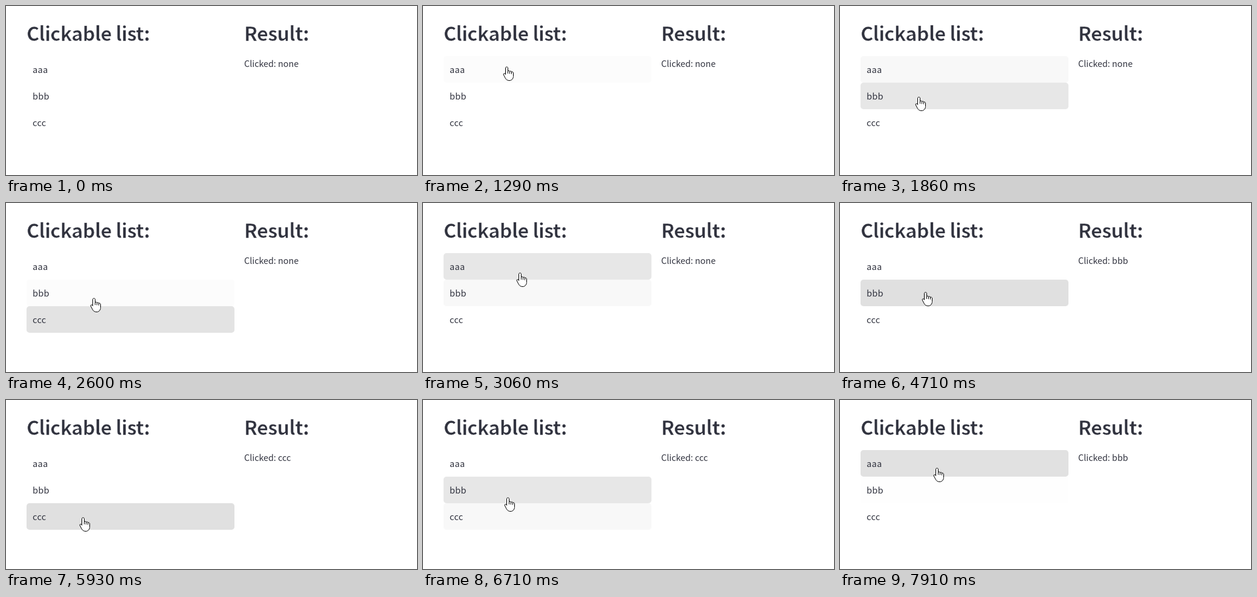
These frames come from a looping animation (680x280 px, 8 s). An HTML page:

```html
<!DOCTYPE html>
<html lang="en">
<head>
<meta charset="utf-8">
<title>Clickable list</title>
<style>
  html, body { margin: 0; width: 100%; height: 100%; overflow: hidden; background: #fff; }
  svg { display: block; width: 680px; height: 280px; }
  text {
    font: 14.32px "Noto Sans CJK JP", "Noto Sans CJK SC", "Noto Sans CJK", sans-serif;
    fill: #31333f;
    white-space: pre;
  }
  /* A thin white outline slims the bold face to a semibold. */
  .heading { font-size: 32.4px; font-weight: 700; letter-spacing: -0.02em; stroke: #fff; stroke-width: .6px; }
  .item { font-size: 14.6px; letter-spacing: .02em; }
</style>
</head>
<body>
<svg viewBox="0 0 680 280">
  <g id="rows"></g>
  <text class="heading" x="34" y="58">Clickable list:</text>
  <text class="heading" x="394" y="58">Result:</text>
  <text id="result" x="394" y="101"></text>
  <g id="pointer">
    <g transform="translate(.5 .5)" fill="#fff" stroke="#000" stroke-linejoin="round" stroke-linecap="round">
      <path d="M-2 12.5V2C-2 0 2 0 2 2V7.4C2.4 6.2 5 6.4 5 8C6 7 8 7.2 8 8.8C9.4 8.2 11 8.6 11 10.6V16C11 19 8.8 23 4.5 23C1 23 -1 21.5 -2.4 18.8L-5.2 13.4C-6 11.4 -3.6 10 -2 12.5Z"/>
      <path fill="none" d="M2 7.4V11M5 8V11.4M8 8.8V11.8"/>
    </g>
    <circle id="click" r="12" fill="#ff0" fill-opacity=".47"/>
  </g>
</svg>
<script>
const LOOP = 8000, FADE = 300, TICK = 110, HOVER_LEAD = 30;
const ROW_TOP = 83, ROW_HEIGHT = 44, HOVER_DROP = 31;
const items = ["aaa", "bbb", "ccc"];

// Pointer moves: when, in how many screen updates, and where to
const moves = [
  [1190, 2, 138, 100], [1740, 2, 130, 150], [2170, 1, 128, 197],
  [2600, 3, 152, 140], [2940, 2, 160, 115], [4050, 3, 141, 147],
  [5170, 2, 127, 194], [6590, 2, 140, 161], [7680, 3, 160, 112]
].map(([start, steps, x, y]) => ({ start, steps, x, y, row: rowAt(y) }));

// Clicks: when, and when the result follows
const clicks = [[3290, 3600], [4490, 4710], [5620, 5930], [7130, 7350]]
  .map(([start, reported]) => ({ start, reported }));

const byId = id => document.getElementById(id);

function rowAt(y) {
  return Math.floor((y - ROW_TOP) / ROW_HEIGHT);
}

const bars = items.map((label, row) => {
  const add = (tag, attrs) => {
    const node = document.createElementNS("http://www.w3.org/2000/svg", tag);
    for (const key in attrs) node.setAttribute(key, attrs[key]);
    return byId("rows").appendChild(node);
  };
  const y = ROW_TOP + ROW_HEIGHT * row;
  const bar = add("rect", { x: 34, y, width: 344, height: ROW_HEIGHT, rx: 4.8 });
  add("text", { x: 44, y: y + 28, class: "item" }).textContent = label;
  return bar;
});

// CSS "ease": cubic-bezier(.25, .1, .25, 1)
function ease(p) {
  if (p <= 0 || p >= 1) return p <= 0 ? 0 : 1;
  const bezier = (a, b, u) => 3 * a * u * (1 - u) ** 2 + 3 * b * u * u * (1 - u) + u ** 3;
  let lo = 0, hi = 1;
  for (let i = 0; i < 20; i++) {
    const mid = (lo + hi) / 2;
    if (bezier(.25, .25, mid) < p) lo = mid; else hi = mid;
  }
  return bezier(.1, 1, lo);
}

const easeOut = p => 1 - (1 - p) ** 3;

function render(t) {
  const index = moves.findLastIndex(m => m.start <= t);
  const move = moves[index];
  const previous = moves[index - 1];
  // The screen updates in coarse ticks, so pointer and fades advance in jumps.
  const tick = move ? Math.floor((t - move.start) / TICK) : 0;
  const fade = ease((tick * TICK + HOVER_LEAD) / FADE);

  bars.forEach((bar, row) => {
    const level = row === move?.row ? fade : row === previous?.row ? 1 - fade : 0;
    const grey = Math.round(255 - HOVER_DROP * level);
    bar.setAttribute("fill", `rgb(${grey},${grey},${grey})`);
  });

  byId("pointer").setAttribute("visibility", move ? "visible" : "hidden");
  if (move) {
    const from = previous || move;
    const p = easeOut(Math.min(1, (tick + 1) / move.steps));
    const along = axis => Math.round(from[axis] + (move[axis] - from[axis]) * p);
    byId("pointer").setAttribute("transform", `translate(${along("x")} ${along("y")})`);
  }

  const pressed = clicks.some(c => t >= c.start && t < c.start + TICK);
  byId("click").setAttribute("display", pressed ? "inline" : "none");
  const done = clicks.findLast(c => c.reported <= t);
  const target = done && moves.findLast(m => m.start < done.start);
  byId("result").textContent = "Clicked: " + (target ? items[target.row] : "none");
}

const start = performance.now();
function frame() {
  render((performance.now() - start) % LOOP);
  requestAnimationFrame(frame);
}
render(0);
requestAnimationFrame(frame);
</script>
</body>
</html>
```
